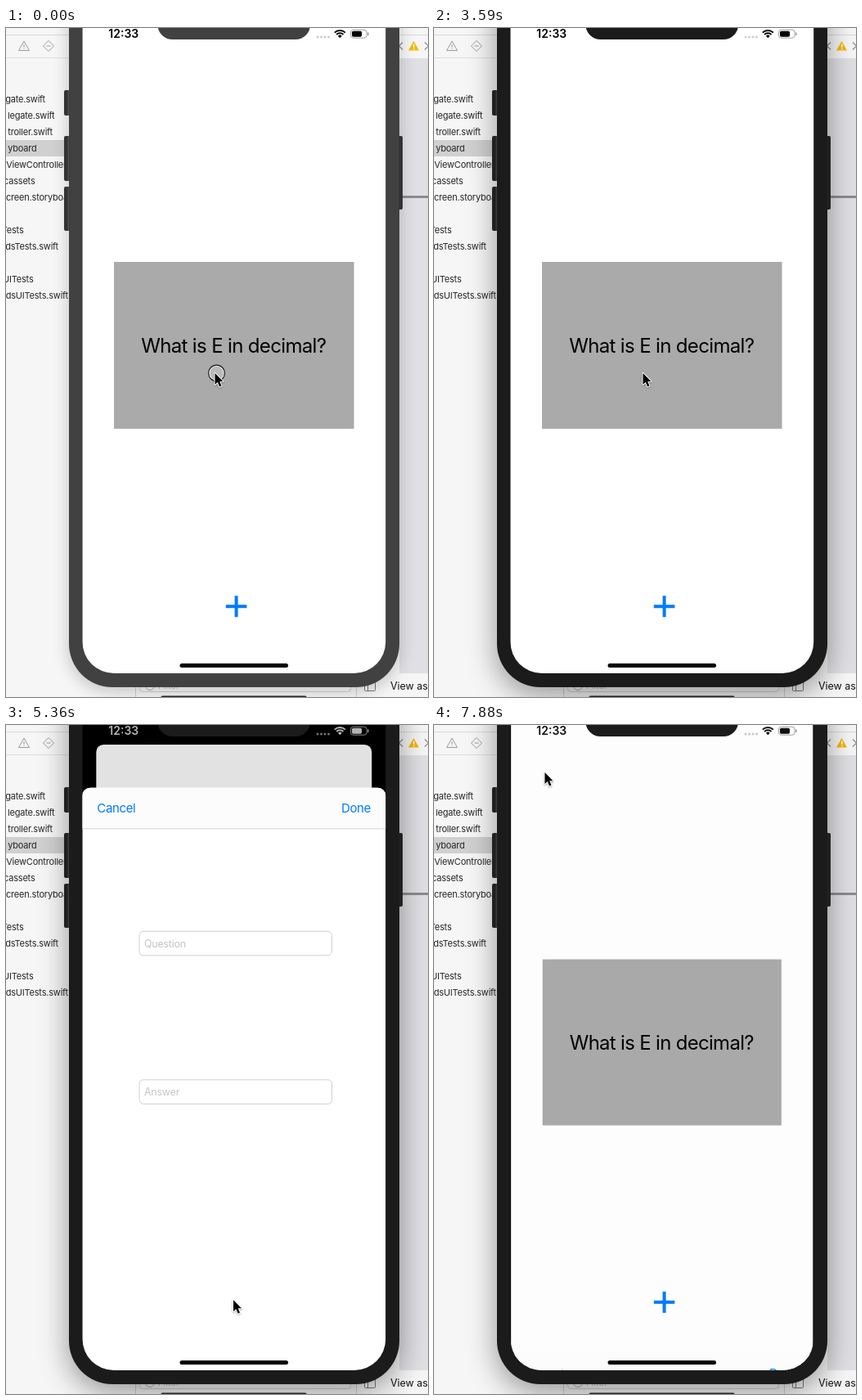
Animation of 516 by 818 pixels, one loop 8000 ms. Source, as an HTML page with a canvas:

```html
<!DOCTYPE html>
<html lang="en">
<head>
<meta charset="utf-8">
<title>Flashcards</title>
<style>
  html, body { margin: 0; width: 100%; height: 100%; overflow: hidden; background: #f5f5f5; }
  canvas { display: block; width: 516px; height: 818px; }
</style>
</head>
<body>
<canvas id="stage" width="516" height="818"></canvas>
<script>
const W = 516, H = 818, LOOP = 8000;
const ctx = document.getElementById('stage').getContext('2d');
const BLUE = '#007aff';

const beats = [0, 150, 2690, 2840, 3440, 3590, 4180, 4330, 4480, 4630, 4920, 5070, 5210,
  5360, 5500, 5650, 5800, 5950, 6090, 6240, 6390, 6840, 6990, 7130, 7430, 7580, 7730, 7880];

// time, x, y of the pointer tip
const pointerPath = [
  [0, 255.5, 422], [4180, 264, 468], [4330, 284, 588], [4480, 290, 672], [4630, 278, 703],
  [5500, 274, 684], [5650, 260, 580], [5800, 233, 430], [5950, 214, 336],
  [6090, 211, 288], [6240, 205, 252], [6390, 202.8, 239],
  [6840, 184, 186], [6990, 148, 92], [7130, 135.5, 58]
];

const presses = [[0, 150], [2690, 2840], [3440, 3590], [4920, 5070], [7430, 7580]];

const files = [
  ['gate.swift', 48, 87], ['legate.swift', 59.5, 107], ['troller.swift', 57, 127],
  ['yboard', 37.5, 147], ['ViewController', 74, 167], ['cassets', 35.5, 187],
  ['creen.storyboa', 76, 207], ['Tests', 21.5, 247], ['dsTests.swift', 64, 267],
  ['UITests', 33.5, 307], ['dsUITests.swift', 76, 327]
];

const clamp = v => Math.max(0, Math.min(1, v));
const during = (t, a, b) => t >= a && t < b;
const lastAt = (list, t, key) => list.filter(v => key(v) <= t).pop();
const gray = v => `rgb(${v},${v},${v})`;
const mix = (a, b, k) => gray(Math.round(a + (b - a) * k));

function rect(x, y, w, h, color) {
  ctx.fillStyle = color;
  ctx.fillRect(x, y, w, h);
}

function round(x, y, w, h, r, fill, stroke) {
  ctx.beginPath();
  ctx.roundRect(x, y, w, h, r);
  if (fill) { ctx.fillStyle = fill; ctx.fill(); }
  if (stroke) { ctx.strokeStyle = stroke; ctx.lineWidth = 1; ctx.stroke(); }
}

function line(points, color, width = 1, close = false) {
  ctx.beginPath();
  points.forEach(([x, y]) => ctx.lineTo(x, y));
  if (close) ctx.closePath();
  ctx.strokeStyle = color;
  ctx.lineWidth = width;
  ctx.stroke();
}

function disc(x, y, r, color) {
  ctx.beginPath();
  ctx.arc(x, y, r, 0, Math.PI * 2);
  ctx.fillStyle = color;
  ctx.fill();
}

function ring(x, y, r, color, width = 1) {
  ctx.beginPath();
  ctx.arc(x, y, r, 0, Math.PI * 2);
  ctx.strokeStyle = color;
  ctx.lineWidth = width;
  ctx.stroke();
}

function text(str, x, y, size, color, { align = 'left', weight = 400, gap = 0 } = {}) {
  ctx.font = `${weight} ${size}px Inter, "Open Sans", sans-serif`;
  ctx.letterSpacing = gap + 'px';
  ctx.textAlign = align;
  ctx.fillStyle = color;
  ctx.fillText(str, x, y);
}

function drawEditor() {
  rect(0, 0, W, H, '#f6f6f6');
  rect(0, 8, W, 1, '#d9d9d9');
  rect(0, 36, 158, 1, '#dedede');
  rect(481, 37, 35, 752, '#e0e0e4');
  rect(481, 205, 35, 3, '#8c8c90');

  // navigator icons
  line([[22, 16], [28.5, 27.5], [15.5, 27.5]], '#9a9a9a', 1, true);
  rect(21.5, 20, 1, 4, '#9a9a9a');
  rect(21.5, 25, 1, 1, '#9a9a9a');
  line([[52, 15.5], [58.5, 22], [52, 28.5], [45.5, 22]], '#9a9a9a', 1, true);
  rect(49.5, 21.5, 5, 1, '#9a9a9a');

  // issue stepper
  line([[485, 17.5], [480.5, 22], [485, 26.5]], '#8a8a8a', 1.2);
  line([[512, 17.5], [516.5, 22], [512, 26.5]], '#8a8a8a', 1.2);
  ctx.beginPath();
  [[498.5, 16], [505, 27.5], [492, 27.5]].forEach(([x, y]) => ctx.lineTo(x, y));
  ctx.closePath();
  ctx.fillStyle = '#f5b800';
  ctx.fill();
  rect(498, 19.5, 1.4, 4.5, '#fff');
  rect(498, 25, 1.4, 1.4, '#fff');

  rect(0, 137, 80, 20, '#d0d0d0');
  files.forEach(([name, right, y]) =>
    text(name, right, y + 4, 11, '#262626', { align: 'right', gap: -0.2 }));

  // bottom bar
  rect(158, 789, 1, 29, '#cfcfcf');
  rect(428, 789, 1, 29, '#cfcfcf');
  round(163.5, 795.5, 258, 16, 4, '#fafafa', '#d0d0d0');
  ring(176, 804, 5.5, '#b0b0b0');
  line([[173, 802.5], [179, 802.5]], '#b0b0b0');
  line([[174.5, 805.5], [177.5, 805.5]], '#b0b0b0');
  text('Filter', 186, 808, 11, '#bcbcbc');
  round(189, 816.6, 179, 12, 3, '#2a2a2a');
  round(438.5, 797.5, 13, 13, 1, null, '#777');
  rect(442, 798, 1, 12, '#777');
  text('View as', 470, 808.5, 12.5, '#111', { gap: -0.05 });
}

function drawBody(active) {
  const shell = active ? '#1b1b1b' : '#414141';
  ctx.save();
  ctx.shadowColor = `rgba(0,0,0,${active ? 0.4 : 0.22})`;
  ctx.shadowBlur = active ? 36 : 20;
  ctx.shadowOffsetY = active ? 10 : 5;
  round(77, -90, 404, 896, 53, shell);
  ctx.restore();
  const key = active ? '#202020' : '#333';
  [[76, 31], [132, 55], [194, 54]].forEach(([y, h]) => {
    round(71, y, 6.5, h, [2, 0, 0, 2], key);
    rect(75.5, y, 1.5, h, active ? '#3a3a3a' : '#505050');
  });
  round(480.5, 132, 4.5, 90, [0, 2, 2, 0], key);
  return shell;
}

function drawHome(t) {
  rect(93, -14, 372, 804, '#fff');
  rect(132, 286, 293.5, 204, '#aaa');
  const flipped = during(t, 2840, 3590);
  text(flipped ? '14' : 'What is E in decimal?', 278.3, 397, 24, '#000',
    { align: 'center', gap: -0.65 });
  ctx.globalAlpha = during(t, 4920, 5360) ? 0.2 : 1;
  ctx.fillStyle = BLUE;
  ctx.beginPath();
  ctx.rect(268.8, 705.2, 25.6, 4);
  ctx.rect(279.6, 694.2, 4, 11);
  ctx.rect(279.6, 709.2, 4, 11);
  ctx.fill();
  ctx.globalAlpha = 1;
}

function drawField(label, y) {
  round(163, y, 235.5, 29.5, 5, '#fff', '#cfcfcf');
  text(label, 169, y + 19.2, 12.5, '#c4c4c6', { gap: -0.25 });
}

function drawSheet(top, t) {
  ctx.save();
  ctx.translate(0, top);
  round(93, 0, 371.5, 830, 10, '#fff');
  round(93, 0, 371.5, 49.5, [10, 10, 0, 0], '#fcfcfc');
  rect(93, 49.5, 372, 1, '#d2d2d2');
  ctx.globalAlpha = t >= 7430 ? 0.3 : 1;
  text('Cancel', 111.3, 30.3, 15, BLUE, { gap: -0.35 });
  ctx.globalAlpha = 1;
  text('Done', 446, 30.3, 15, BLUE, { align: 'right', gap: -0.35 });
  drawField('Question', 175.5);
  drawField('Answer', 357);
  ctx.restore();
}

function drawStatus(light) {
  const ink = mix(0, 255, light);
  text('12:33', 125.3, 12, 14, ink, { weight: 600 });
  for (let i = 0; i < 4; i++) disc(381 + i * 4.5, 11, 1.5, mix(205, 70, light));

  ctx.strokeStyle = ink;
  ctx.fillStyle = ink;
  const a = -Math.PI * 0.75, b = -Math.PI * 0.25;
  ctx.beginPath();
  ctx.moveTo(408.3, 12.2);
  ctx.arc(408.3, 12.2, 3.4, a, b);
  ctx.fill();
  ctx.lineWidth = 1.9;
  [5.9, 9.2].forEach(r => {
    ctx.beginPath();
    ctx.arc(408.3, 12.2, r, a, b);
    ctx.stroke();
  });

  const edge = mix(160, 125, light);
  round(421.5, 2.2, 19.5, 10, 3, null, edge);
  round(423, 3.7, 12, 7, 1.6, ink);
  round(442, 5.2, 1.5, 4, [0, 1, 1, 0], edge);
}

// How far the sheet has been brought in, 0 to 1.
function sheetAmount(t) {
  if (t < 5210) return 0;
  if (t < 7580) return 1 - 0.053 * Math.exp(-0.014 * (t - 5360));
  return Math.min(1, 0.05 * Math.exp(-0.014 * (t - 7880)));
}

function drawScreen(t, shell) {
  const p = sheetAmount(t);
  ctx.save();
  ctx.beginPath();
  ctx.roundRect(93.5, -60, 370.7, 849, 38);
  ctx.clip();
  rect(93, -20, 372, 810, '#000');

  ctx.save();
  const s = 1 - 0.097 * p;
  ctx.translate(278.75, -14 + 40 * p);
  ctx.scale(s, s);
  ctx.translate(-278.75, 14);
  if (p > 0) {
    ctx.beginPath();
    ctx.roundRect(93.25, -14, 371, 803, 10);
    ctx.clip();
  }
  drawHome(t);
  rect(93, -14, 372, 804, `rgba(0,0,0,${0.12 * p})`);
  ctx.restore();

  if (p > 0) drawSheet(36 + 770 * (1 - p), t);
  const light = t < 7580 ? clamp((t - 5150) / 300) : clamp(1 - (t - 7580) / 320);
  drawStatus(light);
  ctx.restore();

  round(185.5, -30, 186.5, 44, 18, shell);
  round(212.5, 777, 132.5, 5, 2.5, '#000');
}

function drawPointer(t) {
  const [, x, y] = lastAt(pointerPath, t, k => k[0]);
  if (presses.some(([a, b]) => during(t, a, b))) {
    disc(x + 2, y, 10, 'rgba(255,255,255,.2)');
    ring(x + 2, y, 8.9, 'rgba(255,255,255,.75)', 1.2);
    ring(x + 2, y, 9.9, '#111', 1.1);
  }
  ctx.save();
  ctx.translate(x, y);
  ctx.beginPath();
  [[0, 0], [0, 14], [3.2, 11.1], [5.6, 16.6], [8, 15.6], [5.7, 10.2], [10, 10.2]]
    .forEach(([px, py]) => ctx.lineTo(px, py));
  ctx.closePath();
  ctx.shadowColor = 'rgba(0,0,0,.35)';
  ctx.shadowBlur = 2;
  ctx.shadowOffsetY = 1;
  ctx.lineJoin = 'round';
  ctx.lineWidth = 2;
  ctx.strokeStyle = '#fff';
  ctx.stroke();
  ctx.shadowColor = 'transparent';
  ctx.fillStyle = '#000';
  ctx.fill();
  ctx.restore();
}

function draw(now) {
  const t = lastAt(beats, Math.max(0, now) % LOOP, v => v);
  drawEditor();
  const shell = drawBody(t >= 2690);
  drawScreen(t, shell);
  drawPointer(t);
}

const start = performance.now();
function tick() {
  draw(performance.now() - start);
  requestAnimationFrame(tick);
}
tick();
</script>
</body>
</html>
```
